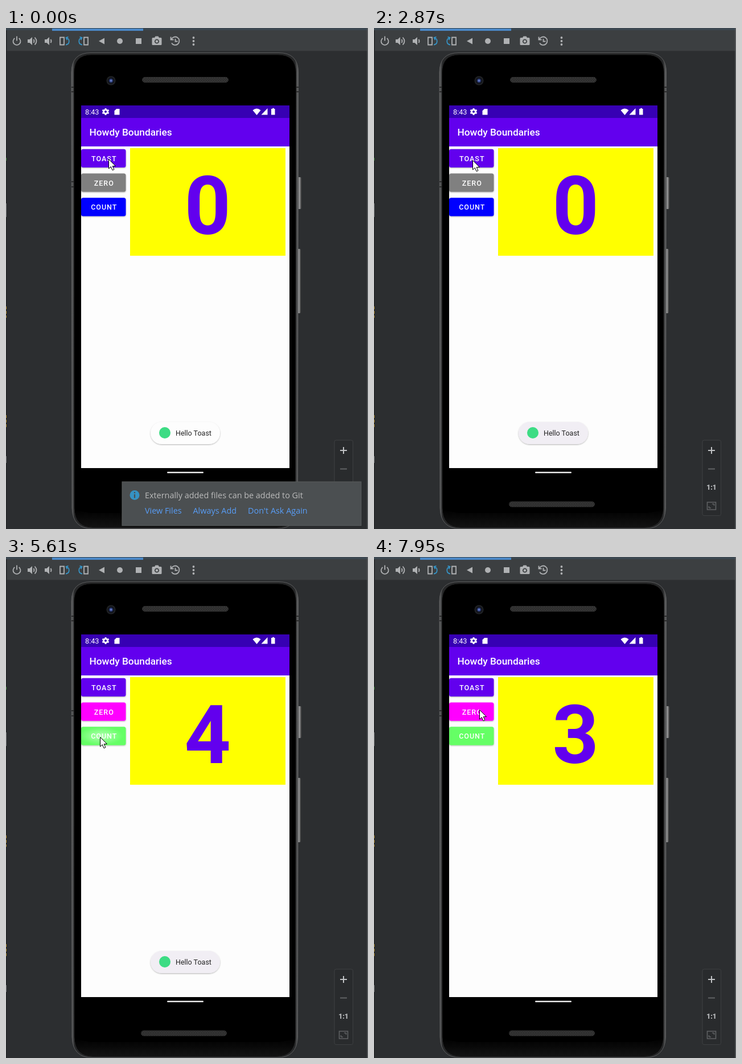
Recreate the animation shown at these times as an HTML page. Size 636 px wide and 880 px high, loop 8000 ms.

```html
<!DOCTYPE html>
<html lang="en">
<head>
<meta charset="utf-8">
<title>Emulator</title>
<style>
html, body { margin: 0; width: 100%; height: 100%; overflow: hidden; background: #2c2e30; }
svg { display: block; width: 636px; height: 880px; }
text { font-family: Roboto, sans-serif; white-space: pre; }
.btn text { font-size: 12.5px; font-weight: 500; letter-spacing: 1px; text-anchor: middle; fill: #fff; }
.note text { font: 14.4px "Open Sans", sans-serif; fill: #bbb; }
.note .link { fill: #589df6; }
.tools { fill: #afb1b3; }
.line { fill: none; stroke: #afb1b3; stroke-width: 1.8; }
.blue { stroke: #3592c4; }
.wave { fill: #fff; opacity: 0; }
#num { font-size: 142px; font-weight: 700; text-anchor: middle; fill: #6200ee; }

/* 1% is 80 ms */
.move, .fade { animation: 8s linear infinite; }
.snap { animation: 8s step-end infinite; }
.move { animation-name: pointer; animation-timing-function: ease-in-out; }
#arrow { animation-name: arrow; }
#hand, #under { animation-name: hover; }
#tips { animation-name: tips; }
#note { animation-name: note; }
#toast { animation-name: toast; }
#pill { animation-name: pill; }
#wave-toast { animation-name: wave-toast; }
#wave-zero { animation-name: wave-zero; }
#wave-count { animation-name: wave-count; }
#splash { animation-name: splash; }

@keyframes pointer {
  0%, 7% { transform: translate(180px, 230px); }
  13.5% { transform: translate(621px, 805px); }
  19.5%, 22% { transform: translate(494px, 857px); animation-timing-function: ease-out; }
  32.5%, 47% { transform: translate(173px, 232px); }
  52% { transform: translate(164px, 272px); }
  56% { transform: translate(173px, 302px); }
  60%, 74.5% { transform: translate(165px, 316px); }
  76.8%, 80.3% { transform: translate(170px, 263px); }
  81.8%, 85.5% { transform: translate(171px, 342px); }
  88.7%, 97% { transform: translate(184px, 307px); }
  99.2%, 100% { transform: translate(185px, 268px); }
}
@keyframes arrow { 0%, 23% { opacity: 1; } 16.5% { opacity: 0; } }
@keyframes hover { 0%, 23% { opacity: 0; } 16.5% { opacity: 1; } }
@keyframes tips { 0%, 23% { opacity: 0; } 13.5% { opacity: 1; } }
@keyframes note { 0% { opacity: 1; } 23%, 100% { opacity: 0; } }
@keyframes toast { 0%, 40%, 50%, 71% { opacity: 1; } 43.5%, 46.5%, 75%, 100% { opacity: 0; } }
@keyframes pill { 0% { fill: #fdfdfd; } 7.5%, 100% { fill: #f1eef4; } }
@keyframes wave-toast { 0%, 1%, 7%, 36%, 42%, 100% { opacity: 0; } 3%, 38% { opacity: .2; } }
@keyframes wave-zero { 0%, 79.5%, 82%, 100% { opacity: 0; } 80.5% { opacity: .2; } }
@keyframes wave-count { 0%, 64%, 76.5%, 91.5% { opacity: 0; } 65%, 74.5%, 92%, 100% { opacity: .18; } }
@keyframes splash { 0%, 64%, 76%, 100% { opacity: 0; } 66%, 74% { opacity: 1; } }
</style>
</head>
<body>
<svg viewBox="0 0 636 880">
<defs>
  <linearGradient id="rim">
    <stop offset="0" stop-color="#6a6b6c"/><stop offset=".014" stop-color="#262728"/>
    <stop offset=".986" stop-color="#262728"/><stop offset="1" stop-color="#6a6b6c"/>
  </linearGradient>
  <linearGradient id="key"><stop offset="0" stop-color="#333"/><stop offset=".5" stop-color="#9a9b9c"/><stop offset="1" stop-color="#3a3a3a"/></linearGradient>
  <linearGradient id="chin" x2="0" y2="1"><stop offset="0" stop-color="#000"/><stop offset="1" stop-color="#121212"/></linearGradient>
  <radialGradient id="lens"><stop offset="0" stop-color="#7f97e8"/><stop offset=".35" stop-color="#26366f"/><stop offset=".55" stop-color="#0e1016"/><stop offset="1" stop-color="#26282a"/></radialGradient>
  <radialGradient id="glow" cx=".45" cy=".5"><stop offset="0" stop-color="#fff" stop-opacity=".5"/><stop offset="1" stop-color="#fff" stop-opacity="0"/></radialGradient>
  <pattern id="mesh" width="3" height="4" patternUnits="userSpaceOnUse">
    <rect width="3" height="4" fill="#181818"/><path d="M0 0L3 4M3 0L0 4" stroke="#484848" stroke-width=".9"/>
  </pattern>
  <filter id="soft" x="-20%" y="-30%" width="140%" height="170%"><feDropShadow dx="0" dy="1" stdDeviation="1" flood-opacity=".3"/></filter>
  <path id="gear" fill-rule="evenodd" d="M-1.3-6h2.6l.4 1.7 1.5.8 1.7-.6 1.3 2.2-1.3 1.2v1.4l1.3 1.2-1.3 2.2-1.7-.6-1.5.8-.4 1.7h-2.6l-.4-1.7-1.5-.8-1.7.6-1.3-2.2 1.3-1.2v-1.4l-1.3-1.2 1.3-2.2 1.7.6 1.5-.8zM0-2a2 2 0 1 0 .01 0z"/>
  <path id="horn" d="M-7-3h3.500L1-7V7l-4.500-4H-7z"/>
  <rect id="key-shape" x="132" width="78.500" height="32.300" rx="3.500"/>
</defs>

<rect width="636" height="880" fill="#2c2e30"/>
<rect width="636" height="4" fill="#3c4750"/>
<rect y="4" width="636" height="36" fill="#3c3f41"/>
<rect y="40" width="636" height="1" fill="#303234"/>
<rect x="81" y="1" width="160" height="4" fill="#4a88c7"/>
<rect x="634.500" width="1.500" height="880" fill="#5e6163"/>
<rect y="4" width="1.500" height="876" fill="#242628"/>
<path d="M.5 228v5" stroke="#3f8a3a"/><path d="M.5 308v24M.5 752v12" stroke="#77797b"/>
<path d="M.5 489v20M.5 680v22" stroke="#b08a2c" stroke-dasharray="5 3"/>

<g class="tools">
  <path class="line" d="M15.300 18a6.500 6.500 0 1 0 7.400 0M19 14.500v8"/>
  <use href="#horn" x="45" y="23"/>
  <path class="line" d="M48.500 20q2 3 0 6M50.500 16.500q6 6.500 0 13"/>
  <use href="#horn" x="75" y="23"/>
  <path class="line" d="M78.500 20q2 3 0 6"/>
  <path class="line" d="M95 16.500h7v13h-7z"/>
  <path class="line blue" d="M105 29.500c7-1 8-10 1-12.500M109.500 15.500L105.500 17l2 4"/>
  <path class="line" d="M137 16.500h7v13h-7z"/>
  <path class="line blue" d="M134 29.500c-7-1-8-10-1-12.500M129.500 15.500L133.500 17l-2 4"/>
  <path d="M163 23l10-5.500v11z"/>
  <circle cx="200" cy="23" r="5"/>
  <rect x="228" y="18" width="10" height="10"/>
  <path fill-rule="evenodd" d="M258 17h3l1.500-2.500h5L269 17h3q1.500 0 1.500 1.500v10q0 1.500-1.500 1.500h-14q-1.500 0-1.500-1.500v-10q0-1.500 1.500-1.500zM265 19.500a4 4 0 1 0 .01 0z"/>
  <circle cx="265" cy="23.500" r="2.300"/>
  <path class="line" d="M290.500 20a7.200 7.200 0 1 1 .5 6.500M289.500 15.500v5h5M297.500 19v4.500h4"/>
  <path d="M329.500 17v.01m0 5.990v.01m0 5.990v.01" stroke="#afb1b3" stroke-width="3.800" stroke-linecap="round"/>
</g>

<rect x="512" y="262" width="7" height="56" rx="2" fill="url(#key)"/>
<rect x="511" y="388" width="7" height="113" rx="2" fill="url(#key)"/>
<path d="M115 78Q115 43.500 149 43.500H479Q513.500 43.500 513.500 78L512.500 843Q511 879.500 476 879.500H152Q117 879.500 116 843Z" fill="url(#rim)" stroke="#5c5d5e"/>
<path d="M119.500 79Q119.500 47 150 47H478Q509.500 47 509.500 79L508.500 843Q507 877 475 877H153Q121 877 120 843Z" fill="#000" stroke="#1c1c1c"/>
<path d="M115 104h4M115 112h4M510 104h4M510 112h4M115 270h4M115 279h4" stroke="#1e1e1e" stroke-width="1.500"/>
<path d="M121 845Q134 850 150 852H478Q496 850 508 845Q506 876.500 475 876.500H153Q122 876.500 121 845" fill="url(#chin)"/>
<circle cx="184.500" cy="92.500" r="8" fill="url(#lens)"/>
<g fill="url(#mesh)" stroke="#2e2e2e">
  <rect x="239.500" y="86.500" width="151" height="9" rx="4.500"/>
  <rect x="237.500" y="832" width="150" height="9" rx="4.500"/>
</g>
<rect x="283" y="779.500" width="64" height="2.500" rx="1.200" fill="#e8e8e8"/>

<rect x="132" y="136" width="366" height="637" fill="#fdfdfd"/>
<rect x="132" y="136" width="366" height="22" fill="#3700b3"/>
<rect x="132" y="158" width="366" height="50" fill="#6200ee"/>
<g fill="#fff">
  <text x="139" y="152" font-size="12.700">8:43</text>
  <use href="#gear" x="175" y="147"/>
  <path d="M194 142h5.500v10.500h-9v-7z"/>
  <path d="M433.500 144.500Q440.500 138.500 447.500 144.500L440.500 153zM459.500 141v11.500H448.500zM467 142h1.200v-1.300h2.600V142h1.700v10.500H466V142z"/>
  <text x="146.500" y="189.300" font-size="17.300" font-weight="500">Howdy Boundaries</text>
</g>

<g class="btn">
  <g filter="url(#soft)">
    <use href="#key-shape" y="212.700" fill="#6200ee"/>
    <use id="zero" href="#key-shape" y="255.500"/>
    <use id="count" href="#key-shape" y="298.200"/>
  </g>
  <text x="172.300" y="233.700">TOAST</text>
  <text x="172.300" y="276.500">ZERO</text>
  <text x="172.300" y="319.200">COUNT</text>
  <use id="wave-toast" class="wave fade" href="#key-shape" y="212.700"/>
  <use id="wave-zero" class="wave fade" href="#key-shape" y="255.500"/>
  <use id="wave-count" class="wave fade" href="#key-shape" y="298.200"/>
  <use id="splash" class="fade" href="#key-shape" y="298.200" fill="url(#glow)"/>
</g>

<rect x="218" y="211" width="273" height="189" fill="#ff0"/>
<text id="num" x="354.300" y="361.500">0</text>

<g id="toast" class="fade">
  <rect id="pill" class="snap" x="254" y="692" width="122" height="39" rx="19.500" filter="url(#soft)"/>
  <circle cx="279" cy="711" r="10" fill="#3ddc84"/>
  <text x="298" y="716" font-size="12.500" fill="#222">Hello Toast</text>
</g>

<g>
  <rect x="577" y="724" width="32.500" height="132.500" rx="3" fill="#292b2d" stroke="#3e4042"/>
  <path d="M587 742h12M593 736v12" stroke="#c0c2c4" stroke-width="2"/>
  <path d="M587 774.500h12" stroke="#606264" stroke-width="2"/>
  <text x="593" y="810.500" text-anchor="middle" font-size="12" font-weight="900" fill="#b8babc">1:1</text>
  <path d="M585.500 833h15v13h-15zM588.500 843v-3M588.500 843h3.500M597.500 836v3M597.500 836h-3.500" fill="none" stroke="#606264" stroke-width="1.600"/>
</g>

<g id="note" class="note snap">
  <rect x="204" y="797" width="420" height="77" fill="#4c4f51" stroke="#595c5e" filter="url(#soft)"/>
  <circle cx="226" cy="820.500" r="8.500" fill="#3592c4"/>
  <path d="M226 815v2.200M226 819v6.500" stroke="#4c4f51" stroke-width="2.200"/>
  <text x="244" y="826">Externally added files can be added to Git</text>
  <text class="link" x="244" y="853">View Files</text>
  <text class="link" x="328.500" y="853">Always Add</text>
  <text class="link" x="425" y="853">Don't Ask Again</text>
  <path id="under" class="snap" d="M425 855.500h105.500" stroke="#589df6" stroke-width="1.200"/>
  <g id="tips" class="snap">
    <use href="#gear" transform="translate(569 814.500) scale(1.300)" fill="#787b7d"/>
    <path d="M599 809.500l10 10m0-10l-10 10" stroke="#85888a" stroke-width="2"/>
  </g>
</g>

<g class="move" fill="#fff" stroke="#000">
  <path id="arrow" class="snap" d="M.5.5V17l3.800-3.500 2.700 6.300 2.900-1.200-2.700-6.100h5.200z"/>
  <path id="hand" class="snap" d="M3.500 1.700Q5-.5 6.500 1.700V7.500Q8 6.500 9 8Q10.500 7 11.500 8.700Q13.500 8 14 10V15L12 21H5L.500 14Q-.800 11 1.500 11L3.500 13z"/>
</g>
</svg>

<script>
const LOOP = 8000;
const $ = id => document.getElementById(id);

// Count after a run of evenly spaced clicks.
const taps = (t, start, gap, max) => Math.max(0, Math.min(max, Math.floor((t - start) / gap)));

function draw(now) {
  const t = now % LOOP;
  const n = t < 6400 ? taps(t, 5100, 125, 6) : taps(t, 7230, 180, 3);
  $("num").textContent = n;
  $("zero").setAttribute("fill", n ? "#f0f" : "#808080");
  $("count").setAttribute("fill", t < 5225 ? "#00f" : "#4f4");
}

const start = performance.now();
function tick() {
  draw(performance.now() - start);
  requestAnimationFrame(tick);
}
tick();
</script>
</body>
</html>
```
